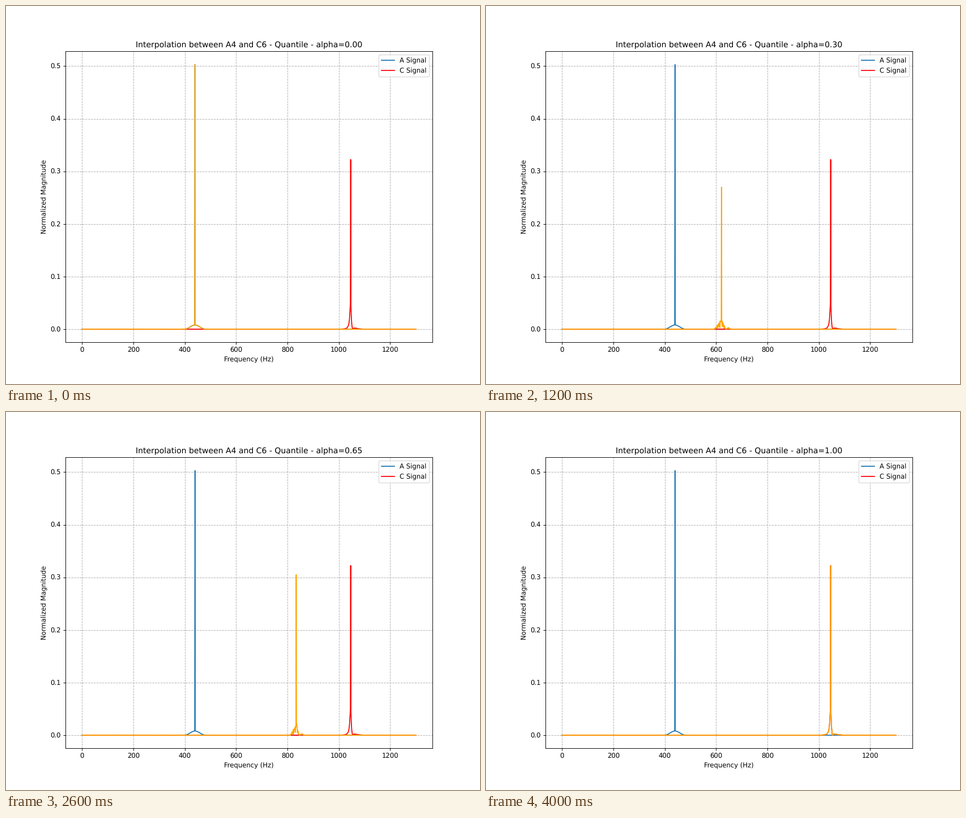
A matplotlib script that plays this animation: 837 px wide and 669 px high, repeating every 4100 ms.

```python
import numpy as np
import matplotlib.pyplot as plt
from matplotlib.animation import FuncAnimation

DPI = 83.7
FRAMES = 41
A_FREQ, A_PEAK = 440.0, 0.503
C_FREQ, C_PEAK = 1046.5, 0.3225

plt.rcParams["font.family"] = "DejaVu Sans"
plt.rcParams["text.hinting"] = "no_hinting"
freq = np.arange(1301.0)


def hann(d, radius):
    """Raised-cosine bump of height 1 that ends at +-radius."""
    return np.where(np.abs(d) < radius, 0.5 + 0.5 * np.cos(np.pi * d / radius), 0)


def a_lobe(d):
    """Main lobe of a Hann window with its faint side lobes."""
    u = d / 20 + 1e-6
    return 0.008 * np.abs(np.sinc(u) / (1 - u**2))


def c_skirt(d):
    """Broad foot on the left, a notch and a small bump on the right."""
    foot = 0.055 / (1 + (d / 3.5) ** 2)
    notch = np.where(d > 0, np.abs(1 - d / 8), 1)
    return foot * notch * hann(d, 60)


def rough_foot(d, alpha):
    """Ragged foot left by regrouping the moved mass into bins."""
    rng = np.random.default_rng(int(alpha * 1000))
    ease = (1 - alpha) ** 2
    radius = np.where(d < 0, 24 + 16 * ease, 13 + 27 * ease**2)
    env = (0.008 + 0.016 * np.sqrt(alpha)) * hann(d, radius)
    env += 0.003 * hann(d - 20 - 15 * ease, 11)
    env += 0.02 * alpha / (1 + d**2)
    depth = min(0.85, 8 * alpha) * np.where(freq % 2, 1, 0.35)
    return env * (1 - depth * rng.random(d.size))


def peak_height(alpha):
    """Fast loss while the peak splits up, then a slow climb."""
    floor = 0.24 + 0.1 * alpha
    split = (A_PEAK - 0.24) * max(0, 1 - (alpha / 0.3) ** 2.5)
    return min(floor, C_PEAK) + split


def blend(alpha):
    centre = int(A_FREQ + alpha * (C_FREQ - A_FREQ))
    d = freq - centre
    near_a = max(0, 1 - 10 * alpha)
    near_c = max(0, 5 * alpha - 4)
    y = (near_a * a_lobe(d) + near_c * c_skirt(d)
         + (1 - near_a - near_c) * rough_foot(d, alpha))
    y[centre] = peak_height(alpha)
    return y


fig, ax = plt.subplots(figsize=(837.01 / DPI, 669.01 / DPI), dpi=DPI)
ax.plot(freq, blend(0), color="#1f77b4", label="A Signal")
ax.plot(freq, blend(1), color="red", label="C Signal")
moving, = ax.plot(freq, blend(0), color="orange")
ax.set_xlim(-65, 1365)
ax.set_ylim(-0.05 * A_PEAK, 1.05 * A_PEAK)
ax.set_xlabel("Frequency (Hz)")
ax.set_ylabel("Normalized Magnitude")
ax.grid(True, linestyle="--")
ax.legend(loc="upper right", labelspacing=0.54)
title = ax.set_title("")


def update(i):
    alpha = i / (FRAMES - 1)
    moving.set_ydata(blend(alpha))
    title.set_text(f"Interpolation between A4 and C6 - Quantile - alpha={alpha:.2f}")
    return moving, title


anim = FuncAnimation(fig, update, frames=FRAMES, interval=100, repeat=True,
                     repeat_delay=0, blit=False)
plt.show()
```
